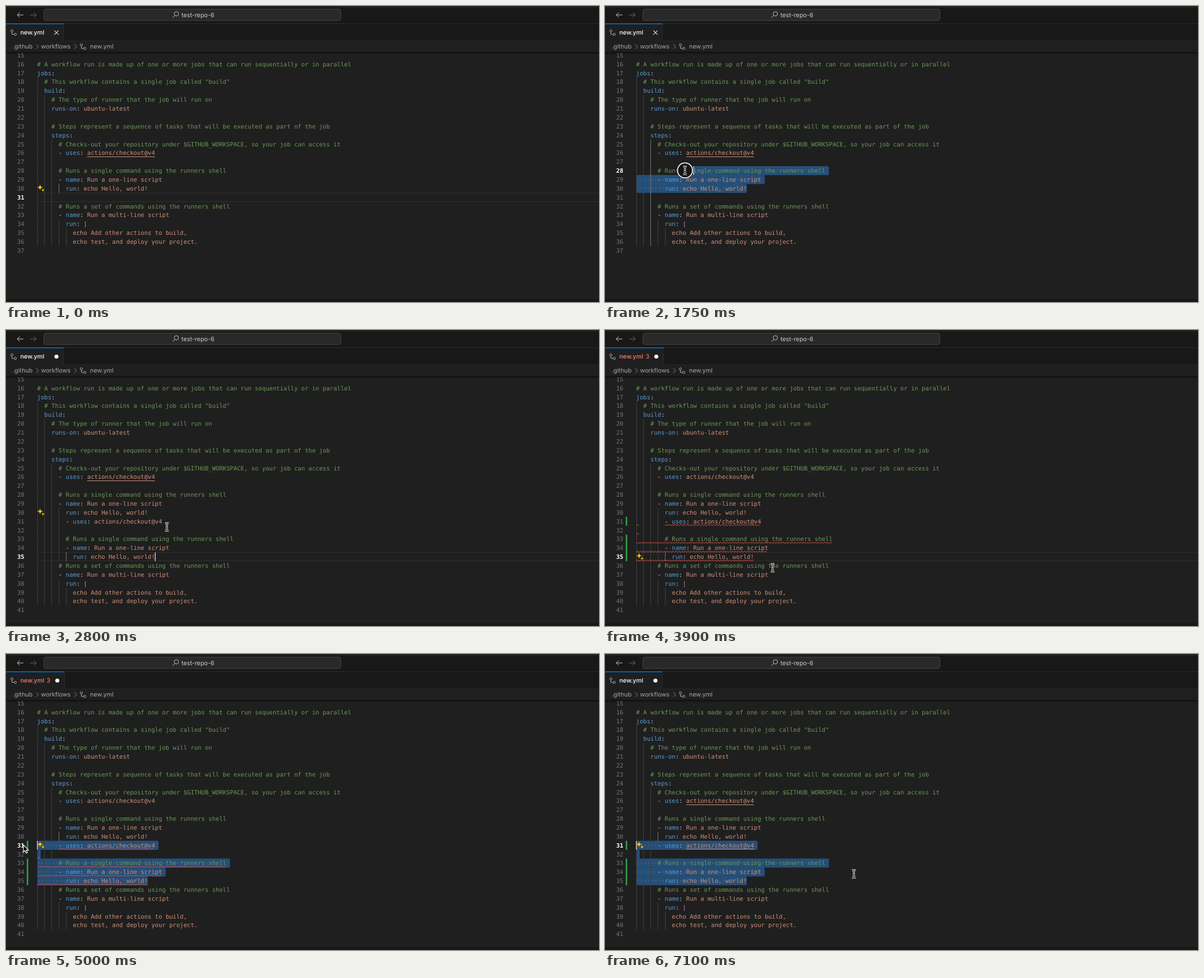
An HTML page with a canvas that plays this animation: 1058 px wide and 529 px high, repeating every 7.31 s.

```html
<!DOCTYPE html>
<html lang="en">
<head>
<meta charset="utf-8">
<title>Editing a workflow</title>
<style>
  html, body { margin: 0; height: 100%; overflow: hidden; background: #1f1f1f; }
  canvas { display: block; }
</style>
</head>
<body>
<canvas id="stage" width="1058" height="529"></canvas>
<script>
const ctx = document.getElementById('stage').getContext('2d');
const LOOP = 7310, FIRST = 15, LEFT = 55.6, CHAR = 6.37, ROW = 15.865;
const MONO = '10.58px "DejaVu Sans Mono", monospace';
const UI = '10.8px Inter, sans-serif';
const COLOR = { comment: '#6a9955', key: '#569cd6', string: '#ce9178', plain: '#cccccc', block: '#c586c0' };

// Moments at which the editor state changes, in ms
const PRESS1 = 1390, RELEASE1 = 2000, CLICK = 2450, PASTE = 2600, ERRORS = 3100, BARS = 3300,
      PRESS2 = 4150, RELEASE2 = 4700, DEDENT = 4950, FIXED = 5350, LINKS = 5600;

const base = `
# A workflow run is made up of one or more jobs that can run sequentially or in parallel
jobs:
  # This workflow contains a single job called "build"
  build:
    # The type of runner that the job will run on
    runs-on: ubuntu-latest

    # Steps represent a sequence of tasks that will be executed as part of the job
    steps:
      # Checks-out your repository under $GITHUB_WORKSPACE, so your job can access it
      - uses: actions/checkout@v4

      # Runs a single command using the runners shell
      - name: Run a one-line script
        run: echo Hello, world!

      # Runs a set of commands using the runners shell
      - name: Run a multi-line script
        run: |
          echo Add other actions to build,
          echo test, and deploy your project.
`.split('\n');
const withPaste = pad => [
  ...base.slice(0, 16),
  ...base.slice(11, 16).map(s => s && pad + s),
  ...base.slice(17)
];
const pasted = withPaste('  '), dedented = withPaste('');

// Pointer path: time, x, y, linear
const path = [
  [650, 290, 346], [1100, 287, 308], [1350, 287, 328], [1450, 287, 328],
  [1750, 143, 294, 1], [1950, 92, 263, 1], [2100, 92, 263], [2450, 287, 352],
  [3350, 287, 352], [3900, 299, 425], [4120, 290, 408], [4200, 290, 408],
  [4600, 31, 341, 1], [5050, 31, 341], [5500, 420, 385], [6650, 420, 385], [7100, 444, 393]
];

function pointer(t) {
  const i = path.findIndex(k => k[0] > t);
  if (i < 1) return (i ? path[path.length - 1] : path[0]).slice(1, 3);
  const a = path[i - 1], b = path[i];
  let u = (t - a[0]) / (b[0] - a[0]);
  if (!b[3]) u = u * u * (3 - 2 * u);
  return [a[1] + (b[1] - a[1]) * u, a[2] + (b[2] - a[2]) * u];
}

const rowY = n => 88 + (n - FIRST) * ROW;
const colX = c => LEFT + c * CHAR;
const within = (t, a, b) => t >= a && t < b;

function rect(x, y, w, h, color) { ctx.fillStyle = color; ctx.fillRect(x, y, w, h); }

function text(s, x, y, color, font = MONO) {
  ctx.font = font;
  ctx.fillStyle = color;
  ctx.fillText(s, x, y + 3.85);
}

function line(points, color, width = 1) {
  ctx.beginPath();
  points.forEach(([x, y]) => ctx.lineTo(x, y));
  ctx.strokeStyle = color;
  ctx.lineWidth = width;
  ctx.stroke();
}

function circle(x, y, r, fill, stroke, width = 1) {
  ctx.beginPath();
  ctx.arc(x, y, r, 0, 7);
  if (fill) { ctx.fillStyle = fill; ctx.fill(); }
  if (stroke) { ctx.strokeStyle = stroke; ctx.lineWidth = width; ctx.stroke(); }
}

function star(x, y, r) {
  ctx.beginPath();
  for (let i = 0; i < 8; i++) {
    const d = i % 2 ? r * 0.38 : r, a = i * Math.PI / 4;
    ctx.lineTo(x + d * Math.cos(a), y + d * Math.sin(a));
  }
  ctx.fillStyle = '#ffcc00';
  ctx.fill();
}

function squiggle(n, from, to) {
  const points = [], end = colX(to);
  for (let x = colX(from), i = 0; x <= end; x += 2.65, i++) points.push([x, rowY(n) + (i % 2 ? 5.6 : 7.9)]);
  line(points, '#f14c4c');
}

function fileIcon(x, y) {
  circle(x + 2.5, y - 3, 2, null, '#b0b0b0');
  circle(x + 8.5, y + 3.2, 2, null, '#b0b0b0');
  line([[x + 2.5, y - 1], [x + 2.5, y + 3.2], [x + 6.5, y + 3.2]], '#b0b0b0');
}

function arrow(x, dir, color) {
  line([[x - 5.5, 16], [x + 5.5, 16]], color);
  line([[x + dir, 11.5], [x + dir * 5.5, 16], [x + dir, 20.5]], color);
}

function header(t) {
  const bad = within(t, ERRORS, FIXED), right = bad ? 104.5 : 102.5;
  rect(0, 0, 1058, 62, '#181818');
  rect(0, 1, 1058, 1, '#333333');
  arrow(25.5, -1, '#cccccc');
  arrow(48.5, 1, '#6b6b6b');
  ctx.beginPath();
  ctx.roundRect(67.5, 5.5, 530, 20.5, 4);
  ctx.fillStyle = '#292929';
  ctx.fill();
  ctx.strokeStyle = '#434343';
  ctx.lineWidth = 1;
  ctx.stroke();
  circle(304, 14, 3.9, null, '#bbbbbb');
  line([[301.2, 16.8], [297, 21]], '#bbbbbb');
  text('test-repo-6', 313, 15.7, '#cccccc', UI);

  rect(0, 31, 1058, 1, '#2b2b2b');
  rect(0, 62, 1058, 1, '#2b2b2b');
  rect(0, 32, right, 31, '#1f1f1f');
  rect(right - 0.5, 32, 1, 30, '#2b2b2b');
  rect(0, 31, right, 1.5, '#0078d4');
  fileIcon(8, 47.5);
  text('new.yml', 25.5, 47.3, bad ? '#f88070' : '#ffffff', '500 ' + UI);
  if (bad) text('3', 72.5, 47.3, '#f88070', UI);
  if (t >= PASTE) circle(bad ? 91.5 : 90, 47.5, 3.6, '#ffffff');
  else {
    line([[86.3, 43.8], [93.7, 51.2]], '#e0e0e0', 1.2);
    line([[93.7, 43.8], [86.3, 51.2]], '#e0e0e0', 1.2);
  }

  text('.github', 12, 72.5, '#a9a9a9', UI);
  text('workflows', 62.5, 72.5, '#a9a9a9', UI);
  fileIcon(132, 72.5);
  text('new.yml', 150, 72.5, '#a9a9a9', UI);
  for (const x of [54, 122]) line([[x, 68.5], [x + 4, 72.5], [x, 76.5]], '#909090');
}

// Selection anchor and focus as [line, column]
function caretState(t, doc) {
  const dragTo = time => {
    const [x, y] = pointer(time - 30);
    const n = Math.round((y - 88) / ROW) + FIRST;
    const c = Math.round((x - LEFT) / CHAR);
    return [n, Math.max(0, Math.min(doc[n - FIRST].length, c))];
  };
  const at = (n, c) => ({ anchor: [n, c], focus: [n, c] });
  if (t < PRESS1) return at(31, 6);
  if (t < CLICK) return { anchor: [30, 31], focus: dragTo(Math.min(t, RELEASE1)) };
  if (t < PASTE) return at(31, 6);
  if (t < PRESS2) return at(35, 33);
  return { anchor: [35, doc[20].length], focus: dragTo(Math.min(t, RELEASE2)) };
}

function caretVisible(t) {
  if (within(t, PRESS1, RELEASE1) || within(t, PRESS2, RELEASE2)) return true;
  const start = t < PRESS1 ? -700 : t < CLICK ? RELEASE1 : t < PRESS2 ? 2350 : t < DEDENT ? RELEASE2 : DEDENT;
  return (t - start) % 1000 < 500;
}

function selection(doc, [n1, c1], [n2, c2]) {
  for (let n = n1; n <= n2; n++) {
    const s = doc[n - FIRST], from = n === n1 ? c1 : 0, to = n === n2 ? c2 : s.length + 1;
    ctx.beginPath();
    ctx.roundRect(colX(from), rowY(n) - 8, (to - from) * CHAR, ROW + 0.2, 2.5);
    ctx.fillStyle = '#264f78';
    ctx.fill();
    for (let c = from; c < to; c++)
      if (s[c] === ' ') rect(colX(c + 0.5) - 0.6, rowY(n) - 0.5, 1.2, 1.2, 'rgba(227,228,226,.36)');
  }
}

function guides(doc, focusLine) {
  const own = s => s.search(/\S/);
  const depth = doc.map((s, i) => s ? own(s) : i && i < doc.length - 1 ? Math.min(own(doc[i - 1]), own(doc[i + 1])) : 0);
  const f = focusLine - FIRST;
  const near = [f, f - 1, f + 1];
  const deepest = Math.max(...near.map(i => depth[i]));
  let top = near.find(i => depth[i] === deepest), bottom = top;
  while (depth[top - 1] >= deepest) top--;
  while (depth[bottom + 1] >= deepest) bottom++;
  depth.forEach((d, i) => {
    for (let c = 0; c < d; c += 2) {
      const active = c === deepest - 2 && i >= top && i <= bottom;
      rect(Math.round(colX(c)), rowY(i + FIRST) - 8, 1, ROW + 0.1, active ? '#757575' : '#404040');
    }
  });
}

function code(s, y) {
  const put = (part, c, color) => text(part, colX(c), y, color);
  const indent = s.search(/\S/);
  if (indent < 0) return;
  const m = s.match(/^(\s*(?:- )?)([\w-]+):(.*)$/);
  if (s[indent] === '#') put(s.slice(indent), indent, COLOR.comment);
  else if (!m) put(s.slice(indent), indent, COLOR.string);
  else {
    const colon = m[1].length + m[2].length;
    if (s[indent] === '-') put('-', indent, COLOR.plain);
    put(m[2], m[1].length, COLOR.key);
    put(':', colon, COLOR.plain);
    put(m[3].trim(), colon + 2, m[3] === ' |' ? COLOR.block : COLOR.string);
  }
}

function sparkle(t) {
  const n = t < PRESS1 || within(t, CLICK + 50, 3200) ? 30 : within(t, 3200, PRESS2) ? 35 : t >= RELEASE2 ? 31 : 0;
  if (!n) return;
  star(60.8, rowY(n) - 1.8, 4.9);
  star(66, rowY(n) + 3, 3);
}

function editor(t) {
  const doc = t < PASTE ? base : t < DEDENT ? pasted : dedented;
  const { anchor, focus } = caretState(t, doc);
  const empty = anchor[0] === focus[0] && anchor[1] === focus[1];
  const focusY = rowY(focus[0]);

  ctx.save();
  ctx.beginPath();
  ctx.rect(0, 82, 1058, 442);
  ctx.clip();
  if (empty) for (const dy of [-8, 7]) rect(56, Math.round(focusY + dy), 1002, 1, '#303030');
  else selection(doc, focus, anchor);
  guides(doc, focus[0]);

  doc.forEach((s, i) => {
    const n = i + FIRST, active = n === focus[0];
    text(n, 20, rowY(n), active ? '#ffffff' : '#6e7681', active ? 'bold ' + MONO : MONO);
    code(s, rowY(n));
  });

  const link = n => {
    const s = doc[n - FIRST], c = s.indexOf('actions');
    rect(colX(c), Math.round(rowY(n) + 6.3), (s.length - c) * CHAR, 1, COLOR.string);
  };
  if (t < ERRORS + 50 || t >= LINKS) link(26);
  if (t >= LINKS) link(31);

  if (t >= BARS) {
    rect(37, rowY(31) - 8, 2.6, ROW, '#2ea043');
    rect(37, rowY(33) - 8, 2.6, 3 * ROW, '#2ea043');
  }
  if (within(t, ERRORS, FIXED)) {
    if (t < DEDENT) squiggle(31, 0, 1);
    squiggle(31, doc[16].indexOf('-'), doc[16].length);
    squiggle(32, 0, 1);
    for (const n of [33, 34, 35]) squiggle(n, 0, doc[n - FIRST].length);
  }
  sparkle(t);
  if (caretVisible(t)) rect(colX(focus[1]) - 0.3, focusY - 7.8, 1.5, ROW - 0.4, '#d0d0d0');
  ctx.restore();

  const shade = ctx.createLinearGradient(0, 82, 0, 87);
  shade.addColorStop(0, 'rgba(0,0,0,.5)');
  shade.addColorStop(1, 'rgba(0,0,0,0)');
  rect(0, 82, 1058, 5, shade);
  rect(0, 524, 1058, 5, '#181818');
}

function mouse(t) {
  if (t < path[0][0]) return;
  const [x, y] = pointer(t);
  if (within(t, PRESS1, RELEASE1) || within(t, CLICK - 20, CLICK + 80) || within(t, PRESS2, RELEASE2)) {
    circle(x, y, 15.2, 'rgba(20,20,20,.88)');
    circle(x, y, 13.4, null, '#f2f2f2', 1.8);
  }
  ctx.save();
  ctx.translate(x, y);
  if (x < 52) {
    ctx.beginPath();
    for (const p of [[0, 0], [0, 13], [3, 10.3], [5, 15], [7.2, 14], [5.2, 9.6], [9.2, 9.6]]) ctx.lineTo(...p);
    ctx.closePath();
    ctx.fillStyle = '#000000';
    ctx.fill();
    ctx.strokeStyle = '#ffffff';
    ctx.lineWidth = 1.2;
    ctx.stroke();
  } else {
    const beam = new Path2D('M-3.2-7Q0-7 0-5V5Q0 7-3.2 7M3.2-7Q0-7 0-5M0 5Q0 7 3.2 7M-2 2H2');
    ctx.strokeStyle = '#ffffff';
    ctx.lineWidth = 3;
    ctx.stroke(beam);
    ctx.strokeStyle = '#111111';
    ctx.lineWidth = 1.1;
    ctx.stroke(beam);
  }
  ctx.restore();
}

const began = performance.now();
function draw() {
  const t = (performance.now() - began) % LOOP;
  ctx.textRendering = 'geometricPrecision';
  rect(0, 0, 1058, 529, '#1f1f1f');
  header(t);
  editor(t);
  mouse(t);
  requestAnimationFrame(draw);
}
draw();
</script>
</body>
</html>
```
